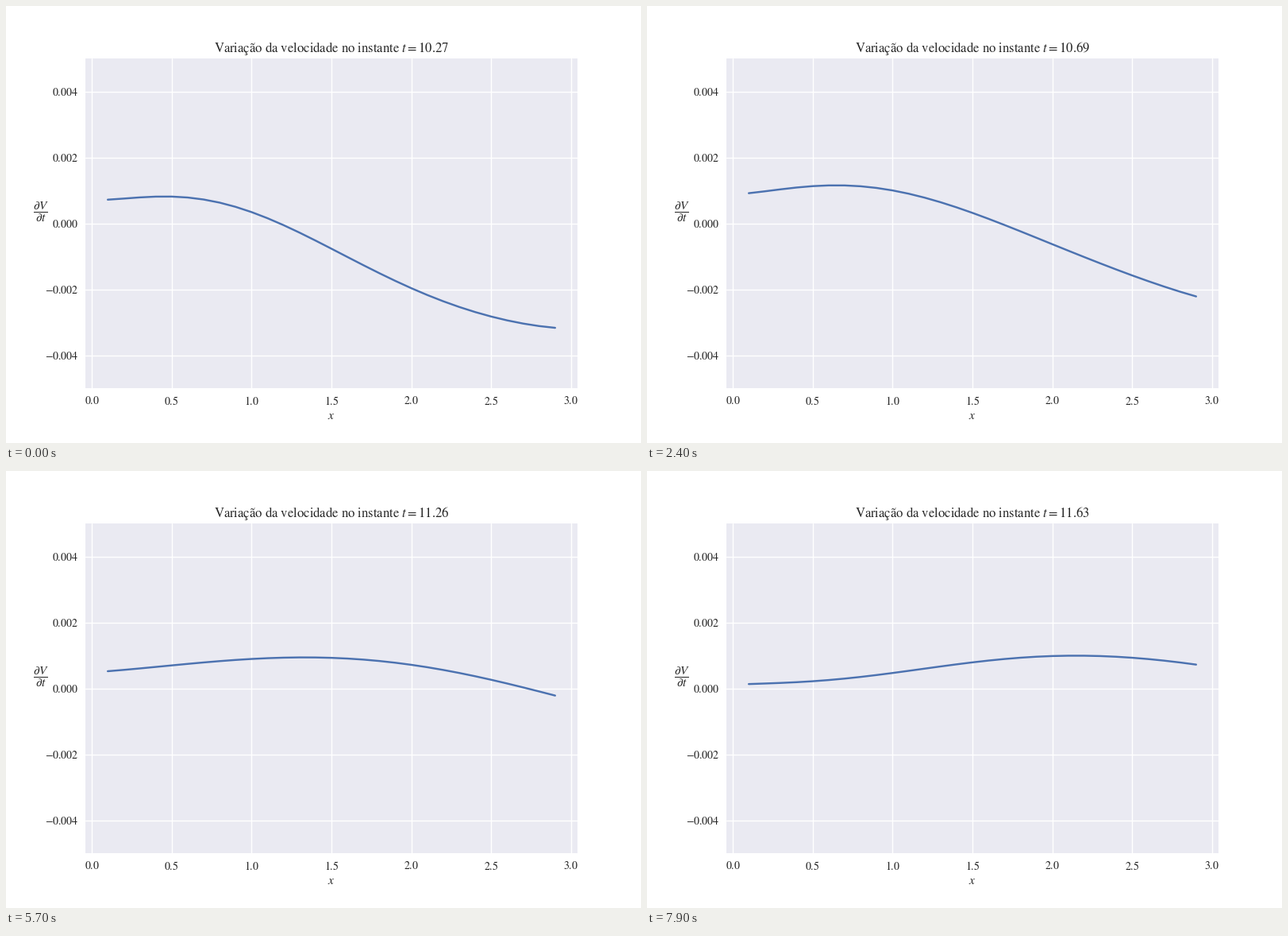
These frames come from a looping animation (800x550 px, 8 s). A matplotlib script:

```python
import matplotlib.pyplot as plt
import numpy as np
from matplotlib.animation import FuncAnimation

FRAMES, INTERVAL = 80, 100
T0, DT = 10.2726, 0.01724
DECAY, OMEGA = 0.568, 1.653

plt.style.use("seaborn-v0_8")
plt.rcParams.update({
    "font.family": "Liberation Serif",
    "mathtext.fontset": "stix",
    "xtick.major.pad": 6.3,
    "ytick.major.pad": 6.3,
})

# One damped oscillating mode: in-phase and quadrature shapes along x.
x = np.linspace(0.1, 2.9, 29)
u = x - 1.5
in_phase = 1e-5 * np.polyval([5.4, -11.9, -15.4, 80.1, -13.8, -250, -76.7], u)
quadrature = 1e-5 * np.polyval([9.5, -5.9, -89, -42, 158], u)


def acceleration(n):
    s = n * DT
    wave = in_phase * np.cos(OMEGA * s) + quadrature * np.sin(OMEGA * s)
    return np.exp(-DECAY * s) * wave


def title_text(n):
    words = "Variação da velocidade no instante".split()
    space = r"\hspace{0.346}"
    phrase = space.join(rf"\mathrm{{{word}}}" for word in words)
    return rf"${phrase}{space}t = {T0 + n * DT:.2f}$"


fig = plt.figure(figsize=(8, 5.5), dpi=100)
ax = fig.add_axes([0.125, 0.125, 0.775, 0.755])
ax.set_xlim(-0.04, 3.04)
ax.set_ylim(-0.005, 0.005)
xticks = np.arange(7) * 0.5
yticks = np.arange(-2, 3) * 0.002
ax.set_xticks(xticks, [f"${v:.1f}$" for v in xticks])
ax.set_yticks(yticks, [f"${v:.3f}$" for v in yticks])
ax.set_xlabel("$x$", labelpad=3.3)
ax.set_ylabel(r"$\dfrac{\partial V}{\partial t}$", rotation=0, labelpad=3.5)
title = ax.set_title(title_text(0))
line, = ax.plot(x, acceleration(0), color="#4C72B0")


def update(n):
    line.set_ydata(acceleration(n))
    title.set_text(title_text(n))
    return line, title


anim = FuncAnimation(fig, update, frames=FRAMES, interval=INTERVAL, repeat=True, repeat_delay=0)
plt.show()
```
